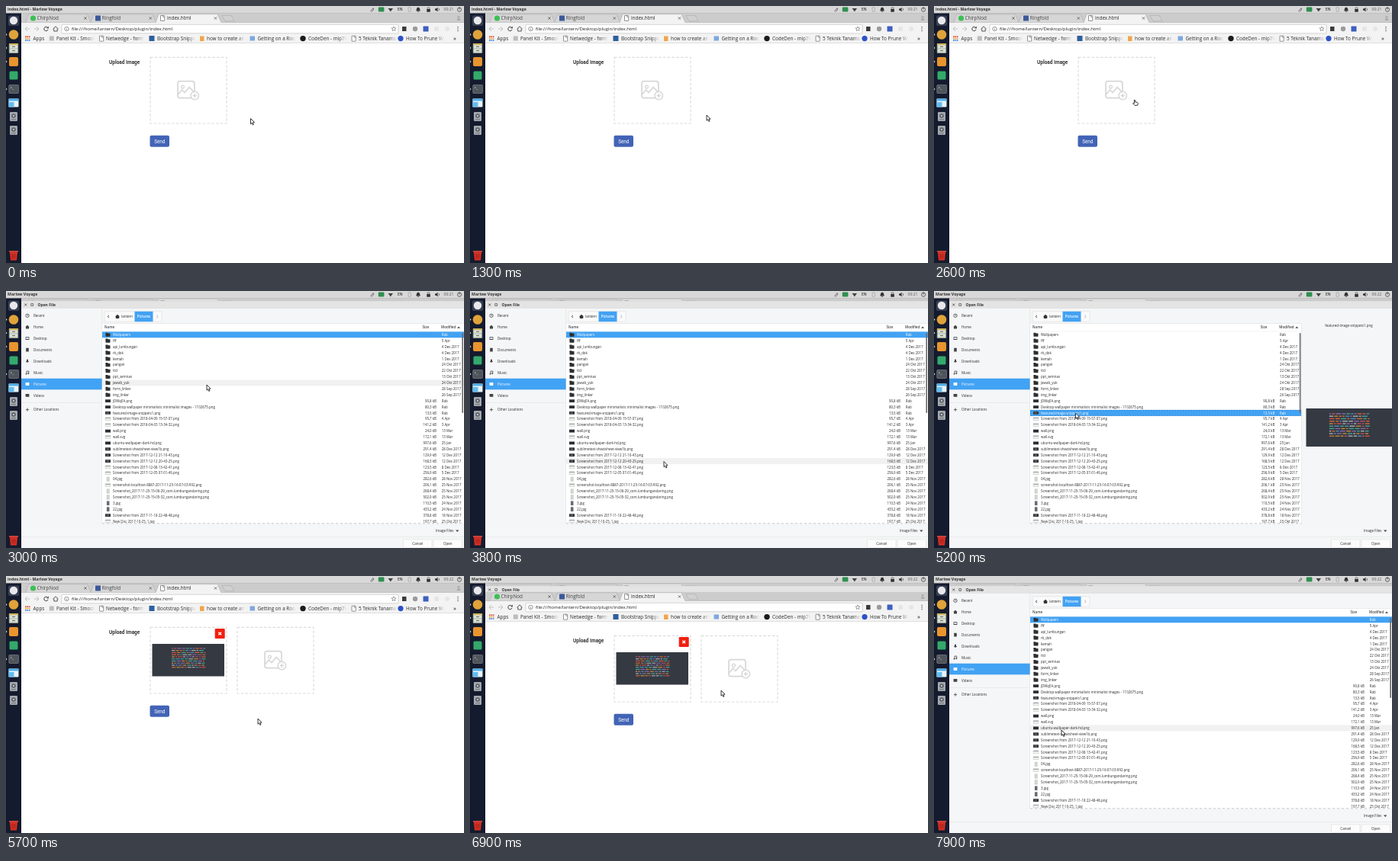
Recreate the animation shown at these times as an HTML page with a canvas. Size 600 by 337 pixels, loop 8 s.

```html
<!DOCTYPE html>
<html lang="en">
<head>
<meta charset="utf-8">
<title>Upload demo</title>
<style>
html, body { margin: 0; width: 100%; height: 100%; overflow: hidden; background: #fff; }
canvas { display: block; width: 600px; height: 337px; }
</style>
</head>
<body>
<canvas id="stage"></canvas>
<script>
const W = 600, H = 337, LOOP = 8000;
const canvas = document.getElementById('stage');
const c = canvas.getContext('2d');
const dpr = window.devicePixelRatio || 1;
canvas.width = W * dpr;
canvas.height = H * dpr;

const UI = '"Open Sans", "Noto Sans", sans-serif';
const FORM = 'Roboto, "Liberation Sans", sans-serif';
const APP = 'Marlow Voyage';
const USER = 'lantern';
const BLUE = '#42a2f3', PALE = '#f5f6f7', INK = '#2b2b2b';
const ROW_TOP = 53.4, ROW_H = 7.89;
const PICK = 13;

// name | size | modified
const FILES = `Wallpapers||Rab
fff||5 Apr
api_lumbungan||4 Des 2017
rk_dok||4 Des 2017
kemah||1 Des 2017
pangan||24 Okt 2017
ttd||22 Okt 2017
ppt_semnas||13 Okt 2017
jawab_yuk||24 Okt 2017
form_linker||28 Sep 2017
img_linker||26 Sep 2017
jDWqEA.png|90,8 kB|Rab
Desktop wallpaper minimalistic minimalist images - 1102675.png|80,3 kB|Rab
featured-image-snippets1.png|13,5 kB|Rab
Screenshot from 2018-04-09 15-57-07.png|95,7 kB|4 Apr
Screenshot from 2018-04-03 13-34-32.png|141,2 kB|3 Apr
wall.png|24,0 kB|13 Mar
wall.svg|172,1 kB|13 Mar
ubuntu-wallpaper-dark-hd.png|997,6 kB|25 Jan
sublimetext-cheatsheet-view1b.png|291,4 kB|28 Des 2017
Screenshot from 2017-12-12 21-10-43.png|129,9 kB|12 Des 2017
Screenshot from 2017-12-12 20-43-25.png|168,5 kB|12 Des 2017
Screenshot from 2017-12-08 13-42-41.png|123,5 kB|8 Des 2017
Screenshot from 2017-12-05 07-01-49.png|256,9 kB|5 Des 2017
04.jpg|282,6 kB|28 Nov 2017
screenshot-localhost-8887-2017-11-25-16-07-03-992.png|206,1 kB|25 Nov 2017
Screenshot_2017-11-25-15-06-29_com.lumbungandaring.png|268,4 kB|25 Nov 2017
Screenshot_2017-11-25-15-05-32_com.lumbungandaring.png|502,9 kB|25 Nov 2017
3.jpg|110,5 kB|24 Nov 2017
22.jpg|433,2 kB|24 Nov 2017
Screenshot from 2017-11-18 22-48-48.png|378,8 kB|18 Nov 2017
New Doc 2017-10-25_1.jpg|197,7 kB|25 Okt 2017`.split('\n').map(s => s.split('|'));

// time, x, y of the pointer tip
const PATH = [
  [0, 320.5, 147.5], [1000, 320.5, 147.5], [2100, 263, 123], [3000, 263, 123],
  [3700, 254, 223.5], [3900, 254, 223.5], [4700, 185.5, 160], [5200, 185.5, 160],
  [5400, 577, 329], [5500, 577, 329], [5700, 330, 187], [5900, 330, 187],
  [6600, 329, 150], [7100, 329, 150], [7800, 167, 202], [LOOP, 167, 202]
];

function rect(x, y, w, h, fill) {
  c.fillStyle = fill;
  c.fillRect(x, y, w, h);
}

function box(x, y, w, h, r, fill, stroke, lw = 0.6) {
  c.beginPath();
  c.roundRect(x, y, w, h, r);
  if (fill) { c.fillStyle = fill; c.fill(); }
  if (stroke) { c.strokeStyle = stroke; c.lineWidth = lw; c.stroke(); }
}

function disc(x, y, r, fill, stroke, lw = 0.8) {
  c.beginPath();
  c.arc(x, y, r, 0, 7);
  if (fill) { c.fillStyle = fill; c.fill(); }
  if (stroke) { c.strokeStyle = stroke; c.lineWidth = lw; c.stroke(); }
}

function shape(pts, fill) {
  c.beginPath();
  pts.forEach(p => c.lineTo(p[0], p[1]));
  c.closePath();
  c.fillStyle = fill;
  c.fill();
}

function line(pts, color, lw = 0.7) {
  c.beginPath();
  pts.forEach(p => c.lineTo(p[0], p[1]));
  c.strokeStyle = color;
  c.lineWidth = lw;
  c.stroke();
}

// y is the middle of the capitals
function text(s, x, y, size, color = INK, weight = 500, align = 'left', font = UI) {
  c.font = `${weight} ${size}px ${font}`;
  c.textAlign = align;
  c.fillStyle = color;
  c.fillText(s, x, y + size * 0.36);
}

function cross(x, y, r, color, lw) {
  line([[x - r, y - r], [x + r, y + r]], color, lw);
  line([[x + r, y - r], [x - r, y + r]], color, lw);
}

function page(x, y) {
  box(x, y - 3.5, 5.2, 7, 0.4, '#fff', '#666', 0.7);
  line([[x + 3.2, y - 3.5], [x + 3.2, y - 1.5], [x + 5.2, y - 1.5]], '#666', 0.6);
}

function topBar(title, time) {
  rect(0, 0, W, 9.5, '#d8d8d8');
  rect(0, 9, W, 0.6, '#b5b5b5');
  text(title, 2, 4.5, 5.2, '#333', 700);
  line([[477.5, 7], [481, 2.6], [482, 4], [479, 7.6]], '#555', 0.8);
  box(487.8, 1.4, 7.6, 6, 1, '#2f8f4e');
  shape([[500.5, 3], [507, 3], [503.8, 7.5]], '#444');
  text('EN', 516.3, 4.6, 4.8, '#333', 600, 'center');
  box(527, 1.6, 3.4, 6, 1.6, null, '#a0a0a0', 0.7);
  shape([[537.2, 6.5], [538.2, 2.8], [540, 1.6], [541.8, 2.8], [542.8, 6.5]], '#333');
  disc(540, 7.2, 0.8, '#333');
  box(551.2, 4, 4.6, 3.8, 0.3, '#333');
  box(552.2, 1.8, 2.6, 3, 1, null, '#333');
  shape([[562, 3.5], [563.5, 3.5], [565.5, 1.8], [565.5, 7.5], [563.5, 5.8], [562, 5.8]], '#333');
  line([[567, 3], [567.6, 4.6], [567, 6.2]], '#444');
  text(time, 580, 4.6, 5, '#555', 400, 'center');
  disc(594, 4.7, 2.6, null, '#444', 0.8);
  line([[594, 1.5], [594, 4.5]], '#444', 0.9);
}

function dock() {
  rect(0, 9.6, 20, H, '#151b2e');
  rect(19.4, 9.6, 0.6, H, '#0d1120');
  box(3, 12.5, 14, 13.5, 2, '#3b4154');
  disc(10, 19, 5.2, '#e8e8ec');
  disc(10, 37.5, 6.3, '#e0a33a');
  box(3.8, 49, 12.4, 13, 1, '#9aa694');
  rect(4.2, 49.3, 11.6, 2, '#d9b64c');
  [51.2, 56.3].forEach(y => {
    box(5, y, 10, 4.4, 0.5, '#dfe3da');
    rect(8, y + 1.6, 4, 1.2, '#6f7a6b');
  });
  box(4, 67, 12, 12, 2, '#e8942f');
  box(4.5, 85.5, 11, 11, 1.5, '#34a96b');
  box(3.8, 103.5, 12.6, 11, 1, '#50555c', '#8a8f96');
  text('>_', 5.5, 107.3, 4.6, '#eee');
  box(3.5, 121.5, 13, 11, 1, '#e9f4fb');
  rect(3.5, 121.5, 13, 3, '#4fb0e8');
  rect(3.5, 126, 7, 6.5, '#64bdf0');
  [145, 163].forEach(y => {
    box(5, y - 6, 10, 12, 1.2, '#a5a9ad');
    disc(10, y - 1, 2.8, '#5d6268');
    disc(10, y - 1, 1.1, '#d5d8da');
    rect(7, y + 3.4, 6, 1, '#70757a');
  });
  [37.5, 55, 73, 109].forEach(y => shape([[0, y - 1.4], [1.6, y], [0, y + 1.4]], '#cfd2da'));
  shape([[5, 323], [15, 323], [14, 333.5], [6, 333.5]], '#d93025');
  box(4, 321, 12, 1.8, 0.5, '#e5483c');
  [8, 10, 12].forEach(x => line([[x, 325], [x, 331.5]], '#8f1a12', 0.7));
}

function tab(x, label, active) {
  const fill = active ? '#f3f3f3' : '#d6d6d6';
  const edge = [[x, 22], [x + 4, 10.8], [x + 81, 10.8], [x + 86, 22]];
  shape(edge, fill);
  line(edge, '#a2a2a2', 0.5);
  text(label, x + 15, 16.2, 6.35, active ? '#222' : '#444');
  cross(x + 78.5, 16, 1.6, '#555', 0.8);
}

function toolbar() {
  rect(20, 22, W, 26.5, '#f3f3f3');
  line([[31, 30], [25, 30]], '#bbb', 0.9);
  line([[28, 27], [25, 30], [28, 33]], '#bbb', 0.9);
  line([[37, 30], [43, 30]], '#bbb', 0.9);
  line([[40, 27], [43, 30], [40, 33]], '#bbb', 0.9);
  c.beginPath();
  c.arc(52.5, 30, 2.7, 0.3, 5.5);
  c.strokeStyle = '#444';
  c.lineWidth = 1;
  c.stroke();
  shape([[53, 29.3], [55.8, 26.6], [55.8, 29.5]], '#444');
  line([[61.5, 30.2], [65, 26.8], [68.5, 30.2]], '#444', 0.9);
  line([[62.8, 29.5], [62.8, 33], [67.2, 33], [67.2, 29.5]], '#444', 0.9);
  box(73, 24.3, 441, 11.5, 1.2, '#fff', '#b9b9b9');
  disc(79.5, 30, 2.7, null, '#666', 0.7);
  line([[79.5, 29.6], [79.5, 31.6]], '#666', 0.7);
  text(`file:///home/${USER}/Desktop/plugin/index.html`, 86, 29.8, 6, '#222');
  const star = [];
  for (let i = 0; i < 11; i++) {
    const r = i % 2 ? 1.4 : 3.2, a = i * Math.PI / 5 - Math.PI / 2;
    star.push([508 + r * Math.cos(a), 30 + r * Math.sin(a)]);
  }
  line(star, '#666', 0.6);
  box(519, 27, 5.5, 6, 0.3, '#3a3a3a');
  disc(536, 30, 3.2, '#9b9b9b');
  box(546.5, 26.5, 7, 7, 0.5, '#3f5fc0');
  box(561, 27, 6, 6, 1, '#e6e6e6');
  disc(578, 30, 3, '#e6e6e6');
  [27.5, 30, 32.5].forEach(y => disc(592, y, 0.75, '#555'));
}

const MARKS = [
  [66, 'Panel Kit - Smooth'], [131, 'Netwedge - forms p'], [198, 'Bootstrap Snippets'],
  [263, 'how to create array'], [329.5, 'Getting on a Roof in'], [396, 'CodeDen - mip7kova'],
  [462, '5 Teknik Tanaman'], [524, 'How To Prune Willow']
];

function bookmarks() {
  const dots = ['#dd4b3e', '#e8a33d', '#4a86e8'];
  for (let i = 0; i < 9; i++) {
    rect(25 + (i % 3) * 2.4, 39.4 + Math.floor(i / 3) * 2.4, 1.7, 1.7, dots[Math.floor(i / 3)]);
  }
  text('Apps', 35.5, 42.6, 6.35);
  MARKS.forEach(([x, s]) => {
    const fade = c.createLinearGradient(x + 40, 0, x + 50, 0);
    fade.addColorStop(0, INK);
    fade.addColorStop(1, 'rgba(43,43,43,0)');
    text(s, x, 42.6, 6.35, fade);
  });
  box(56.8, 39.5, 6, 6, 0.5, '#bcbcbc');
  page(122.5, 42.7);
  box(187.5, 39, 7, 7, 0.5, '#2d5f9e');
  box(254, 39.5, 5.5, 6.5, 0.5, '#efa64c');
  box(319.5, 39.5, 6.5, 6, 0.5, '#7fa8de');
  disc(389, 42.6, 3.7, '#1b1b1b');
  page(453, 42.7);
  disc(517, 42.6, 3.6, '#2c50c8');
  text('»', 588, 42.3, 7, '#444', 600, 'center');
}

function slot(x) {
  c.setLineDash([3.6, 2.2]);
  box(x, 67.3, 100, 86.7, 0, null, '#dcdcdc', 1.2);
  c.setLineDash([]);
}

function addIcon(x, y) {
  const g = '#d7d7d7';
  box(x - 12.5, y - 11.3, 22, 22, 3, null, g, 1.7);
  disc(x - 6, y - 4, 1.9, null, g, 1.3);
  line([[x - 12, y + 6], [x - 7, y], [x - 3.5, y + 3.5], [x + 2.5, y - 3.5], [x + 9, y + 3]], g, 1.6);
  disc(x + 9.8, y + 7.5, 5.2, '#fff', g, 1.5);
  line([[x + 7, y + 7.5], [x + 12.6, y + 7.5]], g, 1.4);
  line([[x + 9.8, y + 4.7], [x + 9.8, y + 10.3]], g, 1.4);
}

// dark picture with rows of coloured snippets
function snippets(x, y, w, h) {
  const tones = ['#d0524c', '#c08a3c', '#4aa294', '#8a68ab', '#a9adb2', '#508fbe', '#d0693a', '#b1526c'];
  let seed = 11;
  const rnd = () => (seed = seed * 16807 % 2147483647) / 2147483647;
  rect(x, y, w, h, '#343942');
  for (let r = 0; r < 10; r++) {
    let u = 0.27;
    while (u < 0.725) {
      const len = Math.min(0.02 + rnd() * 0.045, 0.74 - u);
      rect(x + u * w, y + (0.125 + r * 0.065) * h, len * w, h * 0.028, tones[Math.floor(rnd() * 8)]);
      u += len + 0.011;
    }
  }
}

function browser(filled) {
  rect(20, 9.6, W, H, '#fff');
  rect(20, 9.6, W, 12.4, '#cccccc');
  tab(25.5, 'ChirpNod', false);
  tab(110.8, 'Ringfold', false);
  disc(35.5, 16, 3.6, '#3fbf57');
  box(117, 12.5, 7, 7, 0.6, '#3b5998');
  const plus = [[283, 12.5], [295, 12.5], [299, 19.8], [287, 19.8], [283, 12.5]];
  shape(plus, '#d0d0d0');
  line(plus, '#a5a5a5', 0.5);
  disc(593, 14.5, 1.4, '#aaa');
  box(590.8, 16.5, 4.4, 2.6, 1, '#aaa');
  rect(20, 21.7, W, 0.5, '#a8a8a8');
  toolbar();
  tab(196, 'index.html', true);
  rect(196.5, 21.5, 85, 1.4, '#f3f3f3');
  page(202.5, 16);
  bookmarks();
  rect(20, 48.3, W, 0.6, '#cfcfcf');

  text('Upload Image', 135, 74, 6.5, '#333', 700, 'left', FORM);
  slot(189);
  if (filled) {
    snippets(191.5, 89, 94.5, 42.5);
    box(273.7, 69, 13, 13, 1, '#f1200f');
    cross(280.2, 75.5, 1.8, '#fff', 1.5);
    slot(303);
    addIcon(351.5, 110);
  } else {
    addIcon(237.5, 110);
  }
  box(188.5, 169.8, 25.5, 15, 2, '#4264b6');
  text('Send', 201.3, 177.4, 6.4, '#fff', 400, 'center', FORM);
}

function dialogTitle() {
  rect(20, 12.8, W, 10, '#e4e4e4');
  rect(20, 12.6, W, 0.5, '#b8b8b8');
  cross(25.7, 18, 1.5, '#444', 0.8);
  box(32.8, 16.6, 2.8, 2.8, 0, null, '#444', 0.7);
  text('Open File', 41.5, 17.9, 5, '#333', 700);
}

const PLACES = ['Recent', 'Home', 'Desktop', 'Documents', 'Downloads', 'Music', 'Pictures', 'Videos'];

function sidebar() {
  rect(20, 22.8, 106, 282, PALE);
  rect(20, 114.7, 106, 14.6, BLUE);
  PLACES.forEach((s, i) => {
    const y = 32.3 + i * 14.95, on = s === 'Pictures', ink = on ? '#fff' : '#444';
    if (i === 0) {
      disc(28, y, 2.2, null, ink, 0.8);
      line([[28, y - 1.3], [28, y], [29, y]], ink, 0.6);
    } else if (i === 1) {
      shape([[25.2, y], [28, y - 2.6], [30.8, y], [30, y], [30, y + 2.3], [26, y + 2.3], [26, y]], ink);
    } else if (i === 4) {
      shape([[27, y - 2.4], [29, y - 2.4], [29, y], [30.4, y], [28, y + 2], [25.6, y], [27, y]], ink);
    } else if (i === 5) {
      line([[27, y + 1.6], [27, y - 2], [29.8, y - 2], [29.8, y + 1]], ink, 0.8);
      disc(26.5, y + 1.6, 0.9, ink);
      disc(29.3, y + 1.2, 0.9, ink);
    } else if (i === 3) {
      box(26.2, y - 2.3, 3.6, 4.6, 0.3, ink);
    } else {
      box(25.6, y - 1.9, 4.8, 3.8, 0.4, ink);
      if (i === 2) rect(26.3, y - 1.1, 3.4, 1.9, '#eee');
    }
    text(s, 36, y, 4.55, on ? '#fff' : INK);
  });
  rect(20, 146, 106, 0.5, '#dcdcdc');
  line([[25.8, 155.6], [30.2, 155.6]], '#444', 0.8);
  line([[28, 153.4], [28, 157.8]], '#444', 0.8);
  text('Other Locations', 36, 155.6, 4.5);
  rect(125.6, 22.8, 0.5, 282, '#dadada');
}

function thumb(i, y) {
  if (i < 11) {
    box(130.5, y - 2.7, 3, 2, 0.4, '#2f2f2f');
    box(130.5, y - 1.9, 6, 4.4, 0.4, '#2f2f2f');
    return;
  }
  const tall = i > 23 && i < 30 && i !== 25;
  const pale = [14, 15, 17, 22, 23, 25, 31].includes(i);
  if (tall) {
    box(132, y - 2.8, 3.4, 5.6, 0, i > 27 ? '#5d6a72' : '#cfd9d4', '#aaa', 0.3);
    return;
  }
  box(130, y - 1.9, 7, 3.8, 0, pale ? '#eef0ee' : '#26292e', '#999', 0.3);
  if (pale) rect(130.3, y - 1.7, 6.4, 0.8, '#7f8a88');
  else if (i > 18 || i === PICK) rect(131.5, y - 0.4, 3.6, 0.8, '#8fa39a');
}

function dialog(picked, px, py) {
  dialogTitle();
  rect(20, 22.8, W, H, PALE);
  rect(20, 22.6, W, 0.4, '#cfcfcf');
  sidebar();

  box(129, 26.8, 75, 13.4, 1, '#fafafa', '#d4d4d4', 0.5);
  line([[135, 31.8], [133.2, 33.5], [135, 35.2]], '#333', 0.9);
  shape([[143, 33.5], [146, 30.8], [149, 33.5], [148.2, 33.5], [148.2, 36], [143.8, 36], [143.8, 33.5]], '#333');
  text(USER, 151, 33.4, 4.5);
  rect(168.5, 26.8, 24, 13.4, BLUE);
  text('Pictures', 180.5, 33.4, 4.5, '#fff', 600, 'center');
  line([[197.3, 31.8], [199.1, 33.5], [197.3, 35.2]], '#aaa', 0.9);

  const right = picked ? 481.5 : W, dx = picked ? -117.7 : 0;
  rect(126, 42.6, right - 126, 262, '#fff');
  rect(126, 42.3, right - 126, 0.5, '#dadada');
  text('Name', 129, 47.8, 4.5, '#444', 600);
  text('Size', 545.5 + dx, 47.8, 4.5, '#444', 600);
  text('Modified', 570 + dx, 47.8, 4.5, '#444', 600);
  shape([[591 + dx, 48.8], [595 + dx, 48.8], [593 + dx, 46.6]], '#444');
  rect(126, 52.8, right - 126, 0.4, '#e2e2e2');

  const hover = px > 126 && px < right && py < 305 ? Math.floor((py - ROW_TOP) / ROW_H) : -1;
  const chosen = picked ? PICK : 0;
  c.save();
  c.beginPath();
  c.rect(126, 53, right - 126, 251.8);
  c.clip();
  FILES.forEach(([name, size, date], i) => {
    const top = ROW_TOP + i * ROW_H, y = top + ROW_H / 2;
    const on = i === chosen, ink = on ? '#fff' : INK;
    if (on) rect(126, top, right - 126, ROW_H, BLUE);
    else if (i === hover) rect(126, top, right - 126, ROW_H, '#f1f1f1');
    thumb(i, y);
    text(name, 140, y, 4.45, ink);
    text(size, 564 + dx, y, 4.45, ink, 500, 'right');
    text(date, 570.8 + dx, y, 4.45, ink);
    if (on && picked) {
      c.setLineDash([2, 1.5]);
      box(126.3, top + 0.3, right - 127, ROW_H - 0.6, 0, null, '#2273b8', 0.5);
      c.setLineDash([]);
    }
  });
  c.restore();
  box(right - 2.7, 55, 1.7, 105, 0.8, '#6c6f73');
  c.setLineDash([3, 3]);
  line([[126, 304.8], [right, 304.8]], '#b5b5b5', 0.7);
  c.setLineDash([]);

  if (picked) {
    rect(481.5, 42.3, 0.5, 262.5, '#dadada');
    text(FILES[PICK][0], 543.5, 45.2, 4.45, INK, 500, 'center');
    snippets(487.5, 154, 112.5, 50);
  }

  text('Image Files', 563, 314.4, 4.5);
  shape([[589, 313.4], [593.4, 313.4], [591.2, 316]], '#444');
  rect(20, 322.5, W, 0.5, '#dcdcdc');
  box(520.5, 325.8, 37.5, 11, 1, '#fcfcfc', '#d4d4d4', 0.5);
  box(560, 325.8, 37.5, 11, 1, '#fcfcfc', '#d4d4d4', 0.5);
  text('Cancel', 539.3, 331.4, 4.5, INK, 500, 'center');
  text('Open', 578.7, 331.4, 4.5, INK, 500, 'center');
}

function pointerAt(t) {
  const i = PATH.findIndex(p => p[0] > t);
  const [t0, x0, y0] = PATH[i - 1], [t1, x1, y1] = PATH[i];
  const u = (t - t0) / (t1 - t0), e = u * u * (3 - 2 * u);
  return [x0 + (x1 - x0) * e, y0 + (y1 - y0) * e];
}

function pointer(x, y, hand) {
  c.save();
  c.translate(x, y);
  c.lineJoin = 'round';
  c.beginPath();
  const pts = hand
    ? [[-0.8, 0.4], [0.4, 0.4], [0.7, 2.8], [3.6, 3.5], [4.3, 4.3], [3.8, 7.2], [0, 7.4], [-2.4, 4.8], [-1.8, 4], [-0.5, 4.6]]
    : [[0, 0], [0, 7.2], [1.6, 5.8], [2.8, 8.4], [4, 7.8], [2.9, 5.3], [5, 5.1]];
  pts.forEach(p => c.lineTo(p[0], p[1]));
  c.closePath();
  c.fillStyle = '#fff';
  c.fill();
  c.strokeStyle = '#222';
  c.lineWidth = 0.9;
  c.stroke();
  c.restore();
}

function draw(t) {
  const shifted = t >= 2700 && t < 2900 || t >= 6900 && t < 7100;
  const open = t >= 2900 && t < 5500 || t >= 7100;
  const filled = t >= 5600;
  const [x, y] = pointerAt(t);

  c.setTransform(dpr, 0, 0, dpr, 0, 0);
  browser(filled);
  if (shifted) {
    dialogTitle();
    c.save();
    c.translate(0, 11);
    browser(filled);
    c.restore();
  }
  if (open) dialog(t >= 4800 && t < 5500, x, y);
  topBar(shifted || open ? APP : 'index.html - ' + APP, t < 4000 ? '00:21' : '00:22');
  dock();

  const inSlot = y > 67 && y < 154 && (x > 189 && x < 289 || filled && x > 303 && x < 403);
  pointer(x, y, inSlot && !open && !shifted);
}

const start = performance.now();
function tick() {
  const t = (performance.now() - start) % LOOP;
  draw(Math.floor(t / 100) * 100);
  requestAnimationFrame(tick);
}
tick();
</script>
</body>
</html>
```
